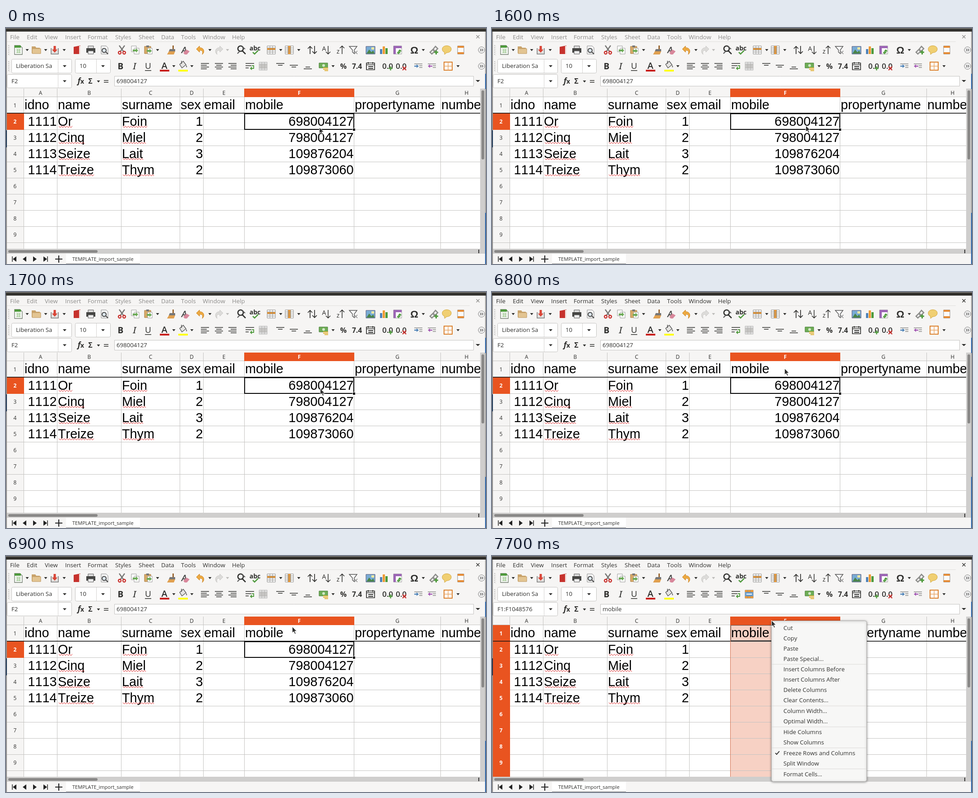
An HTML page with a canvas for the animation above (8 s loop, 1064 by 526 pixels).

```html
<!DOCTYPE html>
<html lang="en">
<head>
<meta charset="utf-8">
<title>Spreadsheet</title>
<style>
html, body { margin: 0; width: 100%; height: 100%; overflow: hidden; }
canvas { display: block; }
</style>
</head>
<body>
<canvas id="stage" width="1064" height="526"></canvas>
<script>
const c = document.getElementById('stage').getContext('2d');
const UI = '"Open Sans", sans-serif', CELL = '"Liberation Sans", Arial, sans-serif';
const ORANGE = '#e95420', INK = '#2f2f2d', PANEL = '#f6f5f4', LINE = '#c4c3c1';
const BLUE = '#4d82b8', GREEN = '#4e9a3c', RED = '#c9302c', AMBER = '#ee9a35', GREY = '#bdbcba';

const CELL_SIZE = 28.8;
const columns = [39, 113, 255, 385, 437, 528, 771, 963, 1078];
const rowTop = n => 118 + 36 * n;
const titles = ['idno', 'name', 'surname', 'sex', 'email', 'mobile', 'propertyname', 'number'];
const people = [
  ['1111', 'Or', 'Foin', '1', '', '698004127'],
  ['1112', 'Cinq', 'Miel', '2', '', '798004127'],
  ['1113', 'Seize', 'Lait', '3', '', '109876204'],
  ['1114', 'Treize', 'Thym', '2', '', '109873060']
];
const menus = { File: 9, Edit: 46, View: 86, Insert: 131, Format: 181, Styles: 242, Sheet: 294, Data: 344, Tools: 388, Window: 436, Help: 501 };
const popup = [
  ['Cut', 'Copy', 'Paste', 'Paste Special...'],
  ['Insert Columns Before', 'Insert Columns After', 'Delete Columns', 'Clear Contents...'],
  ['Column Width...', 'Optimal Width...'],
  ['Hide Columns', 'Show Columns'],
  ['Freeze Rows and Columns', 'Split Window'],
  ['Format Cells...']
];
const pointerPath = [
  [0, 694, 221], [1400, 694, 220], [1600, 695, 217], [1700, 696, 214.5],
  [6800, 648, 170], [6900, 634, 157], [7000, 622, 147], [7100, 619, 143]
];

function rect(x, y, w, h, fill) { c.fillStyle = fill; c.fillRect(x, y, w, h); }

function shape(d, fill, stroke, width = 1) {
  const path = new Path2D(d);
  if (fill) { c.fillStyle = fill; c.fill(path); }
  if (stroke) { c.strokeStyle = stroke; c.lineWidth = width; c.stroke(path); }
}

function icon(x, y, ...layers) {
  c.save();
  c.translate(x, y);
  layers.forEach(layer => shape(...layer));
  c.restore();
}

function text(str, x, y, size = 13.2, color = INK, align = 'left', font = UI, style = '') {
  c.font = `${style} ${size}px ${font}`;
  c.fontKerning = 'none';
  c.fillStyle = color;
  c.textAlign = align;
  c.fillText(str, x, y);
}

function box(x, y, w, h, fill, stroke, r = 0) {
  c.beginPath();
  c.roundRect(x + .5, y + .5, w - 1, h - 1, r);
  c.fillStyle = fill; c.fill();
  c.strokeStyle = stroke; c.lineWidth = 1; c.stroke();
}

const arrow = (x, y, color = INK, s = 3.5) => icon(x, y, [`M${-s} -2H${s}L0 2.5Z`, color]);
const lines = (x, y, rows, color = INK) =>
  icon(x, y, [rows.map(([a, b, v]) => `M${a} ${v}H${b}`).join(''), null, color, 1.6]);
const page = 'M-7 -9H4L8 -5V9H-7Z';

function tableIcon(x, y, head, accent) {
  icon(x, y, ['M-9 -9H9V9H-9Z', '#fff', '#888'], [head, accent],
    ['M-9 -4.5H9M-9 0H9M-9 4.5H9M-3 -9V9M3 -9V9', null, '#8b8b89']);
}

function grip(y) {
  for (let i = 0; i < 6; i++) { rect(5, y + i * 4, 2, 2, GREY); rect(8, y + 2 + i * 4, 1, 1, '#cfcecc'); }
}

function more(y) {
  icon(1054, y, ['M-7 0A7 7 0 1 1 7 0A7 7 0 1 1 -7 0Z', '#fafafa', '#777'],
    ['M-3.5 -3L-.5 0L-3.5 3M.5 -3L3.5 0L.5 3', null, '#555', 1.2]);
}

function mainToolbar() {
  const y = 49;
  grip(38);
  icon(27, y, ['M-8 -10H4L9 -5V10H-8Z', '#fff', '#6f7b6b', 1.3], ['M-8 -10H6V-5H-8Z', GREEN],
    ['M-5 -2H6M-5 2H6M-5 6H6M-1 -2V7M3 -2V7', null, '#7cb36b']);
  icon(67, y, ['M-10 -8H-2L0 -5H8V7H-10Z', '#c9a36b'], ['M-9 -3H10V8H-9Z', '#e3c592', '#bd965e']);
  icon(108, y, ['M-8 -4V9H8V-4', '#e3e2e0', '#777', 1.5], ['M-2.5 -9H2.5V-1H6L0 6L-6 -1H-2.5Z', '#d94436']);
  icon(158, y, ['M-8 -7L7 -10V9L-8 9Z', '#c6322d'], ['M4 -9H7V9H4Z', '#f3dedb']);
  icon(188, y, ['M-6 -9H6V-3H-6Z', '#ddd', '#555'], ['M-10 -4H10V6H-10Z', '#454543'], ['M-6 2H6V9H-6Z', '#eee', '#555']);
  icon(218, y, [page, '#f8f8f8', '#888'], ['M-5 1A4.5 4.5 0 1 1 4 1A4.5 4.5 0 1 1 -5 1ZM3 4L8 9', '#dce6ee', '#444', 2]);
  icon(257, y, ['M-6 -10L4 4M6 -10L-4 4', null, '#777775', 2.5],
    ['M-8 6A3 3 0 1 1 -2 6A3 3 0 1 1 -8 6ZM2 6A3 3 0 1 1 8 6A3 3 0 1 1 2 6Z', null, RED, 2.3]);
  icon(287, y, ['M-9 -9H2V4H-9Z', '#fafafa', '#999'], ['M-3 -4H8V9H-3Z', '#fff', '#999'], ['M-6 -1H1V-4L6 1L1 6V3H-6Z', '#6caa57']);
  icon(316, y, ['M-9 -8H5V8H-9Z', '#d8aa68', '#a97a3c'], ['M-5 -10H1V-6H-5Z', '#777'],
    ['M-2 -4H8V9H-2Z', '#fff', '#999'], ['M-4 0H2V-3L7 2L2 7V4H-4Z', '#6caa57']);
  icon(366, y, ['M3 -10H6V-2H3Z', '#9b6732'], ['M-3 -2H9V3H-5Z', '#777'], ['M-5 3H9L6 10H-9Z', '#e0a050']);
  text('A', 395, y + 7, 20, '#444', 'center', UI, 'italic 600');
  icon(399, y + 4, ['M-6 2L1 -5L8 -1L2 6H-3Z', '#d8879b']);
  icon(431, y, ['M-9 -2L-2 -9V-5C7 -6 11 4 4 10C6 3 4 0 -2 1V5Z', '#edaa42', '#cc8220']);
  icon(472, y, ['M9 -2L2 -9V-5C-7 -6 -11 4 -4 10C-6 3 -4 0 2 1V5Z', '#dddcda', '#c8c7c5']);
  icon(522, y, ['M-8 -3A6 6 0 1 1 4 -3A6 6 0 1 1 -8 -3ZM2 2L9 9', '#f4f4f3', INK, 2.6], ['M-9 8L-3 2M1 -8L8 -2', null, '#555', 2]);
  text('abc', 552, y + 1, 14, INK, 'center', UI, 'bold');
  icon(552, y, ['M-5 5L-1 9L7 1', null, GREEN, 2.5]);
  tableIcon(588, y, 'M-9 -4.5H9V0H-9Z', AMBER);
  tableIcon(628, y, 'M-3 -9H3V9H-3Z', AMBER);
  icon(679, y, ['M-5 9V-8M-10 -3L-5 -8L0 -3M5 -9V8M0 3L5 8L10 3', null, INK, 1.7]);
  for (const [x, letter, up] of [[709, 'A', 1], [740, 'z', -1]]) {
    text(letter, x - 4, y + (up > 0 ? 2 : 8), 14, INK, 'center');
    icon(x + 5, y, [`M0 -9V9M-5 ${4 * up}L0 ${9 * up}L5 ${4 * up}`, null, INK, 1.5]);
  }
  icon(770, y, ['M-9 -8H8L2 0V8L-2 5V0Z', '#fafafa', '#555', 1.4], ['M2 2L9 9M9 2L2 9', null, '#888', 1.4]);
  icon(808, y, ['M-10 -8H10V9H-10Z', '#79acd5', '#557'], ['M-9 8L-3 -1L2 5L6 1L9 8Z', '#4a8449'], ['M2 -6H8V-1H2Z', '#f4e8a1']);
  icon(838, y, ['M-9 -2H-4V9H-9Z', BLUE], ['M-3 -8H2V9H-3Z', AMBER], ['M3 -4H8V9H3Z', GREEN]);
  icon(868, y, ['M-9 -9H9V9H-9Z', '#fff', '#999'], ['M-9 -9H9V-4H-9ZM-9 -9H-4V9H-9Z', '#9c65b5'],
    ['M0 6H5V0M2 3L5 0L8 3M3 3L0 6L3 9', null, GREEN, 2]);
  text('Ω', 905, y + 8, 22, INK, 'center', CELL, 'bold');
  icon(948, y, ['M-8 5L-2 -1L2 3L-4 9ZM-1 -2L4 -8L9 -3L3 3Z', null, '#8e8e8c', 2.6], ['M1 5H10M5.5 1V10', null, GREEN, 3]);
  icon(977, y, ['M-10 -2C-10 -12 10 -12 10 -2C10 4 4 6 0 6L-5 10V5C-8 4 -10 2 -10 -2Z', '#f0cf72', '#d3a73c']);
  icon(1008, y, ['M-7 -9H7V9H-7Z', '#fafafa', '#888'], ['M-7 -9H7V-5H-7ZM-7 5H7V9H-7Z', '#e68a32']);
  [47, 88, 129, 336, 452, 609, 649, 925].forEach(x => arrow(x, y));
  arrow(491, y, GREY);
  more(y);
}

function combo(x, w, split, label, y = 69, h = 32) {
  box(x, y, w, h, '#fff', LINE, 3);
  rect(split, y + 1, 1, h - 2, '#d4d3d1');
  text(label, x + 10, y + 20);
  arrow(split + 15, y + h / 2, INK, 4);
}

function formatToolbar(columnSelected) {
  const y = 85;
  grip(74);
  combo(12, 134, 115, 'Liberation Sa');
  combo(153, 79, 200, '10');
  text('B', 254, 92, 19, INK, 'center', UI, 'bold');
  text('I', 285, 92, 20, INK, 'center', '"Noto Serif", serif', 'italic');
  text('U', 315, 91, 19, INK, 'center');
  rect(308, 94, 14, 1.5, INK);
  text('A', 351, 91, 20, INK, 'center', UI, '600');
  rect(341, 93, 21, 4, '#c9211e');
  icon(392, 82, ['M-7 -1L1 -8L7 0L-2 7Z', '#e5e4e2', '#555', 1.3], ['M-3 -9V-2', null, '#555', 1.5], ['M7 0C11 4 9 7 7 5Z', '#777']);
  rect(382, 93, 21, 4, '#ffff00');
  lines(441, y, [[-9, 9, -6], [-9, 4, -2], [-9, 9, 2], [-9, 4, 6]]);
  lines(472, y, [[-9, 9, -6], [-6, 6, -2], [-9, 9, 2], [-6, 6, 6]]);
  lines(502, y, [[-9, 9, -6], [-4, 9, -2], [-9, 9, 2], [-4, 9, 6]]);
  lines(541, y, [[-10, 9, -6], [-10, 3, -1], [-10, -3, 4]]);
  icon(541, y, ['M4 -1H8V5H1M4 2L1 5L4 8', null, GREEN, 1.8]);
  if (columnSelected) {
    tableIcon(570, y, 'M-9 -9H9V-4.5H-9ZM-9 4.5H9V9H-9Z', AMBER);
    icon(570, y, ['M-9 -4H9V4H-9Z', '#6b9fce'], ['M-6 0H6', null, '#fff', 2]);
  } else {
    icon(570, y, ['M-9 -9H9V9H-9Z', '#ddd', '#bbb'], ['M-9 -4H9V4H-9Z', '#c7c6c4'], ['M-3 -9V9M3 -9V9M-9 -4H9M-9 4H9', null, '#b1b0ae']);
  }
  lines(608, y, [[-9, 9, -6], [-5, 5, -2]]);
  lines(638, y, [[-9, 9, -2], [-5, 5, 2]]);
  lines(669, y, [[-9, 9, 6], [-5, 5, 2]]);
  icon(704, y, ['M-10 -7H9V4H-10Z', '#6ead55', '#447d36'], ['M-3 -1.5A3 3 0 1 1 3 -1.5A3 3 0 1 1 -3 -1.5Z', '#d2e7c8'],
    ['M-1 4H10M-1 7H10M2 10H10', null, '#e1b33d', 2.2]);
  text('%', 748, 91, 16, INK, 'center', UI, 'bold');
  text('7.4', 778, 91, 15.5, INK, 'center', UI, 'bold');
  icon(808, y, ['M-9 -7H9V8H-9Z', '#fff', INK, 1.7], ['M-9 -3H9M-5 -9V-5M5 -9V-5', null, INK, 1.7], ['M-5 1H6M-5 5H6', null, INK, 2]);
  for (const [x, mark, color] of [[846, 'M2 6H11M6.5 1.5V10.5', GREEN], [876, 'M3 2L11 10M11 2L3 10', RED]]) {
    text('0.0', x, 91, 17, INK, 'center', UI, '600');
    icon(x, 84, [mark, null, color, 2.4]);
  }
  for (const [x, dir, color] of [[914, 1, BLUE], [944, -1, '#a45ab4']]) {
    lines(x, y, [[-9, 9, -5], [2, 9, -1], [2, 9, 3]], '#8a8a88');
    icon(x - 4, y, [`M${-5 * dir} -1.2H0V-4L${5 * dir} 0L0 4V1.2H${-5 * dir}Z`, color]);
  }
  icon(980, y, ['M-9 -9H9V9H-9Z', '#fff', '#dc812d', 2], ['M0 -9V9M-9 0H9', null, '#e8a868', 1.5]);
  [372, 412, 725, 1002].forEach(x => arrow(x, y));
  more(y);
}

function formulaBar(columnSelected) {
  combo(2, 144, 115, columnSelected ? 'F1:F1048576' : 'F2', 103, 31);
  text('f', 162, 124, 17, INK, 'center', UI, 'bold italic');
  text('x', 169, 124, 14, INK, 'center', UI, 'bold');
  text('Σ', 187, 124, 16, INK, 'center', UI, 'bold');
  arrow(205, 119);
  icon(222, 119, ['M-5 -2H5M-5 2H5', null, INK, 1.6]);
  box(240, 107, 797, 23, '#fff', LINE);
  text(columnSelected ? 'mobile' : people[0][5], 245, 123);
  arrow(1046, 118, INK, 5);
}

function squiggle(x, y, width) {
  let d = `M${x} ${y}`;
  for (let i = 1; i * 3 <= width; i++) d += `L${x + i * 3} ${y + (i % 2) * 3.5}`;
  shape(d, null, '#d33', 1);
}

function sheet(columnSelected) {
  c.save();
  c.beginPath(); c.rect(2, 135, 1049, 357); c.clip();
  rect(2, 135, 1049, 357, '#fff');
  if (columnSelected) rect(529, 154, 242, 338, '#f7d1c4');
  rect(2, 135, 1049, 18, PANEL);
  rect(2, 135, 37, 357, PANEL);
  columns.forEach(x => rect(x, 135, 1, 357, LINE));
  for (let n = 0; n <= 10; n++) rect(2, rowTop(n) + 36 - (n ? 0 : 1), 1049, 1, LINE);

  rect(528, 135, 244, 19, ORANGE);
  if (columnSelected) rect(2, 154, 38, 338, ORANGE);
  else rect(2, 190, 38, 37, ORANGE);
  for (let n = 1; n <= 10; n++) {
    const active = columnSelected || n === 2;
    text(n, 20, rowTop(n) + 22.5, 12, active ? '#fff' : INK, 'center', UI, active ? 'bold' : '');
  }
  titles.forEach((title, i) => {
    const mid = i === 7 ? 1021 : (columns[i] + columns[i + 1]) / 2 + .5;
    text('ABCDEFGH'[i], mid, 149, 12, i === 5 ? '#fff' : INK, 'center', UI, i === 5 ? 'bold' : '');
    text(title, columns[i] + 2, 180.5, CELL_SIZE, '#000', 'left', CELL);
  });
  people.forEach((row, n) => row.forEach((value, i) => {
    const y = 217.5 + n * 36, isName = i === 1 || i === 2;
    text(value, isName ? columns[i] + 2 : columns[i + 1] - .5, y, CELL_SIZE, '#000', isName ? 'left' : 'right', CELL);
    if (isName) squiggle(columns[i] + 4, y + 1, c.measureText(value).width - 1);
  }));
  rect(2, 189, 1049, 1.5, '#111');
  if (columnSelected) {
    rect(528, 154, 1, 338, '#d2714f');
    rect(771, 154, 1, 338, '#d2714f');
    shape('M529.5 154.5H771V188.5H529.5Z', null, '#555');
  } else {
    shape('M529 191H771V226H529Z', null, '#000', 2);
    rect(768, 223, 7, 7, '#fff');
    rect(769, 224, 5, 5, '#000');
  }
  c.restore();

  rect(1051, 135, 11, 368, '#cfcecd');
  rect(2, 492, 1060, 11, '#cfcecd');
  c.fillStyle = '#898887';
  c.beginPath(); c.roundRect(1054, 139, 6, 154, 3); c.roundRect(5, 495, 198, 6, 3); c.fill();
  rect(1047, 494, 2, 8, '#333');
}

function tabs() {
  rect(2, 503, 1060, 23, PANEL);
  rect(133, 503, 164, 22, '#fff');
  rect(133, 525, 164, 1, '#777');
  icon(18, 515, ['M-4 -6V6', null, '#222', 1.5], ['M5 -6V6L-3 0Z', '#222']);
  icon(41, 515, ['M4 -6V6L-4 0Z', '#222']);
  icon(64, 515, ['M-4 -6V6L4 0Z', '#222']);
  icon(88, 515, ['M4 -6V6', null, '#222', 1.5], ['M-5 -6V6L3 0Z', '#222']);
  icon(117, 515, ['M-8 0H8M0 -8V8', null, '#222', 2.2]);
  text('TEMPLATE_import_sample', 147, 518.5, 11);
}

function contextMenu() {
  c.save();
  c.shadowColor = '#0006'; c.shadowBlur = 5; c.shadowOffsetY = 1;
  box(619, 144, 212, 359, '#f7f7f6', '#b0afad', 4);
  c.restore();
  let y = 160;
  popup.forEach((group, i) => {
    if (i) rect(620, y - 12, 210, 1, '#dbdad8');
    for (const label of group) {
      text(label, 646, y + 4.5, 13);
      if (label.startsWith('Freeze')) icon(632, y, ['M-4 0L-1 3L5 -4', null, INK, 1.8]);
      y += 23;
    }
    y += .8;
  });
}

function draw(t) {
  const focused = t >= 2800, columnSelected = t >= 7700;
  rect(0, 0, 1064, 526, PANEL);
  rect(0, 0, 1064, 8, focused ? '#302e2a' : '#33322e');
  rect(0, 0, 1064, 2, '#6f6e6b');
  rect(0, 8, 2, 518, '#8f8e8c');
  rect(0, 228, 2, 38, '#17324f');
  rect(1062, 8, 2, 518, '#a3a2a0');
  rect(1062, 102, 2, 34, '#2a64a8');
  rect(1062, 412, 2, 114, '#2a64a8');
  for (const name in menus) text(name, menus[name], 25, 13.2, focused ? INK : '#8d8c8a');
  icon(1046, 19.5, ['M-3.5 -3.5L3.5 3.5M3.5 -3.5L-3.5 3.5', null, focused ? INK : '#8d8c8a', 1.4]);
  rect(2, 30, 1026, 1, '#e0dfdd');
  mainToolbar();
  formatToolbar(columnSelected);
  formulaBar(columnSelected);
  sheet(columnSelected);
  tabs();
  if (columnSelected) contextMenu();
  const [, x, y] = pointerPath.findLast(key => key[0] <= t);
  icon(x, y, ['M.5 .5V14.5L3.8 11.5L6.2 17L8.6 16L6.2 10.7H10.6Z', '#30302f', '#fff']);
}

function tick() {
  draw(performance.now() % 8000);
  requestAnimationFrame(tick);
}
tick();
</script>
</body>
</html>
```
